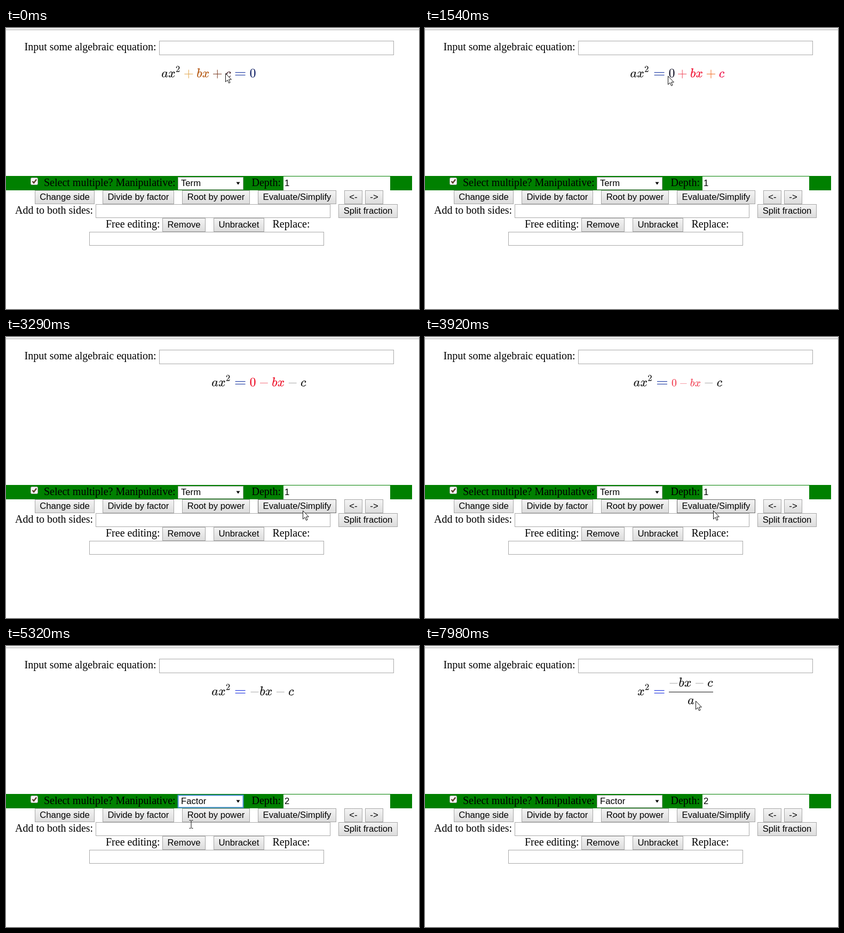
Write an HTML page that moves like this. It is 774x528 px and loops after 8 s.

```html
<!DOCTYPE html>
<html lang="en">
<head>
<meta charset="utf-8">
<title>Algebra editor</title>
<style>
  html, body { margin: 0; width: 100%; height: 100%; overflow: hidden; background: #fff; }
  svg { display: block; width: 774px; height: 528px; }
  .label { font: 20px "Liberation Serif", serif; }
  .ui { font: 16.67px "Liberation Sans", sans-serif; }
  .field { fill: #fff; stroke: #a9a9a9; }
</style>
</head>
<body>
<svg viewBox="0 0 774 528" xmlns="http://www.w3.org/2000/svg">
  <defs>
    <linearGradient id="face" x2="0" y2="1">
      <stop offset="0" stop-color="#f4f4f4"/><stop offset="1" stop-color="#dcdcdc"/>
    </linearGradient>
    <linearGradient id="down" x2="0" y2="1">
      <stop offset="0" stop-color="#dcdcdc"/><stop offset="1" stop-color="#f2f2f2"/>
    </linearGradient>
  </defs>
  <rect width="774" height="528" fill="#fff"/>
  <rect width="774" height="3" fill="#f1f1f1"/>
  <rect y="3" width="774" height="1" fill="#b0b0b0"/>
  <rect y="278" width="761" height="27" fill="#008000"/>
  <g class="label">
    <text x="34.5" y="42">Input some algebraic equation:</text>
    <text x="71" y="297">Select multiple? Manipulative:</text>
    <text x="460.5" y="297">Depth:</text>
    <text x="17" y="349">Add to both sides:</text>
    <text x="187" y="375">Free editing:</text>
    <text x="499.5" y="375">Replace:</text>
  </g>
  <rect class="field" x="287.5" y="24.5" width="439" height="26"/>
  <rect class="field" x="168.5" y="331.5" width="439" height="25"/>
  <rect class="field" x="156.5" y="383.5" width="439" height="25"/>
  <rect x="520" y="279" width="200" height="26" fill="#fff"/>
  <rect x="46.5" y="281.5" width="13" height="13" rx="2" fill="#f6f6f6" stroke="#a8a8a8"/>
  <path d="M49.5 288l2.6 3 5-6.5" fill="none" stroke="#5a3c28" stroke-width="2.4"/>
  <g id="buttons" class="ui"></g>
  <rect id="select" x="322.5" y="280.5" width="122" height="23" fill="#fff"/>
  <path d="M431.5 289.5h7l-3.5 5z"/>
  <text id="kind" class="ui" x="328" y="297"></text>
  <text id="depth" class="ui" x="522" y="297"></text>
  <g id="math"></g>
  <g id="menu" class="ui"></g>
  <g id="cursor">
    <path id="arrow" d="M.5 .5V16.2L4.1 12.8 6.6 18.5 9 17.4 6.6 11.9H11.4Z" fill="#fff" stroke="#111"/>
    <path id="beam" d="M-3.5 -7.5H-1L0 -6.5 1 -7.5H3.5M0 -6.5V6.5M-3.5 7.5H-1L0 6.5 1 7.5H3.5" fill="none" stroke="#111"/>
  </g>
</svg>
<script>
const LOOP = 8000, STEP = 70, EM = 24.2, BASE = 92.55;
const RED = '#ee1028', GREY = '#a9a9a9', INK = '#151515';
const $ = id => document.getElementById(id);

// Glyph outlines on a 1000 unit em, y up
const glyphs = {
  a: 'M33 157Q33 258 109 349T280 441Q331 441 370 392Q386 422 416 422Q449 420 449 394Q449 381 412 234T374 68Q374 26 402 26Q435 28 463 131Q469 153 483 153Q506 153 506 144Q506 138 501 117T481 63T449 13Q430 -10 393 -10Q320 -10 300 51Q233 -10 172 -10Q117 -10 75 30T33 157ZM351 328Q351 334 346 350T323 385T277 405Q242 405 210 374T160 293Q118 180 118 106Q118 26 179 26Q217 26 254 59T298 110Q300 114 325 217T351 328Z',
  b: 'M73 647Q73 683 89 683L234 694Q246 694 246 685L176 399Q231 442 283 442Q345 442 383 396T422 280Q422 169 343 79T173 -11Q123 -11 82 27T40 150Q40 190 97 414Q147 611 147 623Q147 637 101 637Q73 637 73 647ZM336 325Q336 405 275 405Q215 405 157 322L136 236Q114 150 114 114Q114 26 178 26Q211 26 245 58Q270 81 285 114T318 219Q336 291 336 325Z',
  c: 'M34 159Q34 268 120 355T306 442Q362 442 394 418T427 355Q427 326 408 306T360 285Q319 285 319 325Q319 370 367 386Q360 404 306 404Q276 404 249 390Q228 381 206 359Q162 315 142 235T121 119Q121 26 205 26Q321 26 394 111Q403 121 406 121Q429 105 429 98Q429 83 346 25T202 -11Q127 -11 81 37T34 159Z',
  x: 'M52 289Q59 331 106 386T222 442Q257 442 286 424T329 379Q371 442 430 442Q467 442 494 420T522 361Q522 290 458 288Q415 290 415 328Q415 374 465 391Q454 404 425 404Q380 408 350 336Q290 115 290 78Q290 26 341 26Q378 26 414 59T463 140Q466 153 485 153Q504 153 504 145Q486 77 440 33T333 -11Q263 -11 227 52Q186 -10 133 -10Q35 -10 35 71Q35 143 99 143Q142 143 142 101Q142 50 91 40Q100 26 132 26Q168 26 194 71Q203 87 217 139T261 313Q266 340 266 352Q266 404 217 404Q177 404 142 372T93 290Q91 278 72 278Q52 278 52 289Z',
  0: 'M96 585Q152 666 249 666Q297 666 345 640T423 548Q460 465 460 320Q460 165 417 83Q370 -22 250 -22Q130 -22 82 83Q39 165 39 320Q39 494 96 585ZM321 597Q291 629 250 629Q208 629 178 597Q153 571 145 525T137 333Q137 175 145 125T181 46Q209 16 250 16Q290 16 318 46Q347 76 354 130T362 333Q362 478 354 524T321 597Z',
  2: 'M109 429Q82 429 66 447T50 491Q50 562 103 614T235 666Q326 666 387 610T449 465Q449 422 429 383T381 315T301 241L142 93H218Q375 92 385 97Q392 99 409 186V189H449L421 0H50V31Q50 40 136 137Q343 350 343 464Q343 527 309 573T212 619Q140 619 109 550Q170 549 170 489Q170 429 109 429Z',
  '+': 'M56 229H722V271H56ZM368 -83H410V583H368Z',
  '-': 'M84 229H694V271H84Z',
  '=': 'M56 353H840V395H56ZM56 147H840V189H56Z'
};
glyphs['~'] = glyphs['-']; // sign without spacing
const advance = { a: .529, b: .429, c: .433, x: .572, 0: .5, 2: .404, '+': 1.222, '-': 1.222, '~': .778, '=': 1.449 };
const lead = { '+': .222, '-': .222, '=': .278 };

const buttons = [
  ['Change side', 54, 305, 112], ['Divide by factor', 181, 305, 134],
  ['Root by power', 330, 305, 127], ['Evaluate/Simplify', 472, 305, 147],
  ['<-', 634, 305, 34], ['->', 673, 305, 34], ['Split fraction', 623, 331, 111],
  ['Remove', 293, 357, 81], ['Unbracket', 389, 357, 95]
];
const kinds = ['Term', 'Factor', 'Fraction', 'Power', 'Bracket', 'Number'];

// Pointer path: time, x, y
const route = [
  [0, 411, 85], [70, 408, 96], [280, 385, 290], [350, 370, 316], [490, 230, 326], [630, 140, 324],
  [700, 134, 323], [1100, 134, 323], [1190, 155, 300], [1400, 380, 150], [1540, 455, 90], [1610, 464, 82],
  [2030, 484, 86], [2170, 488, 86], [2380, 497, 86], [2590, 497, 86], [2660, 500, 86], [2730, 500, 86],
  [2870, 560, 150], [3010, 700, 290], [3150, 660, 318], [3290, 556, 326], [3500, 540, 326], [3920, 540, 326],
  [4060, 480, 327], [4200, 360, 326], [4340, 300, 322], [4480, 345, 318], [4550, 352, 312], [4620, 352, 296],
  [4970, 352, 296], [5040, 351, 312], [5180, 347, 335], [5320, 347, 335], [5390, 346, 328], [5600, 352, 250],
  [5880, 380, 110], [6090, 390, 86], [6300, 390, 86], [6370, 386, 105], [6580, 308, 290], [6650, 289, 311],
  [6790, 289, 315], [7140, 289, 315], [7560, 530, 130], [7770, 507, 103], [LOOP, 507, 103]
];

const clamp = v => Math.max(0, Math.min(1, v));
const swing = (t, start) => .5 - .5 * Math.cos(Math.PI * clamp((t - start) / 680));
const between = (t, a, b) => t >= a && t < b;
const escape = s => s.replace(/</g, '&lt;');

function mix(a, b, k) {
  const part = (s, i) => parseInt(s.slice(i, i + 2), 16);
  return 'rgb(' + [1, 3, 5].map(i => Math.round(part(a, i) + (part(b, i) - part(a, i)) * k)) + ')';
}

function pointer(t) {
  const i = route.findIndex(p => p[0] > t), [t0, x0, y0] = route[i - 1], [t1, x1, y1] = route[i];
  const k = (t - t0) / (t1 - t0);
  return [x0 + (x1 - x0) * k, y0 + (y1 - y0) * k];
}

// Sets a run of glyphs; color is one value or one per glyph
function run(str, x, y, color, size = 1) {
  let out = '';
  [...str].forEach((ch, i) => {
    const fill = Array.isArray(color) ? color[i] : color || ('-~'.includes(ch) ? GREY : INK);
    const em = EM * size, up = ch === '2', s = em * (up ? .7 : 1) / 1000;
    out += `<path transform="translate(${x + (lead[ch] || 0) * em} ${y - (up ? .413 * em : 0)}) scale(${s} ${-s})" fill="${fill}" d="${glyphs[ch]}"/>`;
    x += advance[ch] * em;
  });
  return out;
}

function equation(t) {
  const equals = (dx = 0) => run('=', 421.5 + dx, BASE, t < 4420 ? '#0a2a9c' : '#0a22dc');
  if (t < 1580) {
    const k = swing(t, 900), f = clamp(t / 560);
    const first = mix('#e2a850', '#f04a5c', f), bx = mix('#b4560f', '#f01030', f);
    const second = mix('#7a3a20', '#f07028', f), c = mix('#3a1820', '#ec1048', f);
    return run('ax2', 291.2 + 94 * k, BASE) + equals() + run('0', 456.5, BASE, mix('#142468', '#1c1c30', f)) +
      run('+bx+c', 327.6 + 141 * k, BASE, [first, bx, bx, second, c]);
  }
  if (t < 4420) {
    const k = swing(t, 3740), shift = 65.9 * k / 2;
    const zero = t < 2170 ? INK : RED, bx = t < 2800 ? INK : RED;
    return run('ax2', 385.2 + shift, BASE) + equals(shift) +
      `<g opacity="${1 - 1.2 * k > 0 ? 1 - 1.2 * k : 0}">` +
      run('0-bx', 456.5 + shift, BASE, [zero, t < 2800 ? GREY : '#f4707c', bx, bx], 1 - k) + '</g>' +
      run('-c', 522.4 - shift, BASE);
  }
  const k = swing(t, 7070);
  return run('a', 385.2 + 106.9 * k, BASE + 16.6 * k, t < 6160 || k === 1 ? INK : RED) +
    run('x2', 398, BASE) + equals() + run('~bx-c', 456.5, BASE - 16.4 * k) +
    (k === 1 ? '<rect x="457" y="86" width="83" height="1" fill="#111"/>' : '');
}

buttons.forEach(([name, x, y, w]) => {
  $('buttons').innerHTML += `<rect x="${x + .5}" y="${y + .5}" width="${w - 1}" height="25"/>` +
    `<text x="${x + w / 2}" y="${y + 18}" text-anchor="middle">${escape(name)}</text>`;
});
const faces = [...$('buttons').querySelectorAll('rect')];

function menu(t, y) {
  if (!between(t, 4760, 5320)) return '';
  const active = y < 327 ? 0 : 1;
  return '<rect x="322.5" y="305.5" width="122" height="128" fill="#fff" stroke="#7f9db9"/>' +
    kinds.map((name, i) => {
      const top = 306 + 21.1 * i, on = i === active;
      return (on ? `<rect x="323" y="${top}" width="121" height="21" fill="#1e90ff"/>` : '') +
        `<text x="328" y="${top + 16.5}" fill="${on ? '#fff' : '#000'}">${name}</text>`;
    }).join('');
}

function draw(t) {
  const [x, y] = pointer(t);
  const inside = (l, top, w, h) => x >= l && x < l + w && y >= top && y < top + h;
  const pressed = between(t, 840, 910) ? 0 : between(t, 3640, 3780) ? 3 : between(t, 7000, 7070) ? 1 : -1;
  const open = between(t, 4760, 5320), focus = between(t, 4760, 6160);

  buttons.forEach(([, l, top, w], i) => {
    const hover = !open && inside(l, top, w, 26) || i === 1 && between(t, 6650, 7840);
    faces[i].setAttribute('stroke', hover ? '#6e6e6e' : '#a6a6a6');
    faces[i].setAttribute('fill', `url(#${i === pressed ? 'down' : 'face'})`);
  });
  $('select').setAttribute('stroke', focus ? '#4d90d8' : inside(322, 280, 123, 24) ? '#6e6e6e' : '#a9a9a9');
  $('select').setAttribute('stroke-width', focus ? 2 : 1);
  $('kind').textContent = kinds[t < 5320 ? 0 : 1];
  $('depth').textContent = t < 5320 ? 1 : 2;
  $('math').innerHTML = equation(t);
  $('menu').innerHTML = menu(t, y);

  const beam = !open && y > 331;
  $('beam').setAttribute('visibility', beam ? 'visible' : 'hidden');
  $('arrow').setAttribute('visibility', beam ? 'hidden' : 'visible');
  $('cursor').setAttribute('transform', `translate(${Math.round(x)} ${Math.round(y)})`);
}

let last = -1;
function tick() {
  const t = performance.now() % LOOP, shown = t - t % STEP;
  if (shown !== last) draw(last = shown);
  requestAnimationFrame(tick);
}
tick();
</script>
</body>
</html>
```
